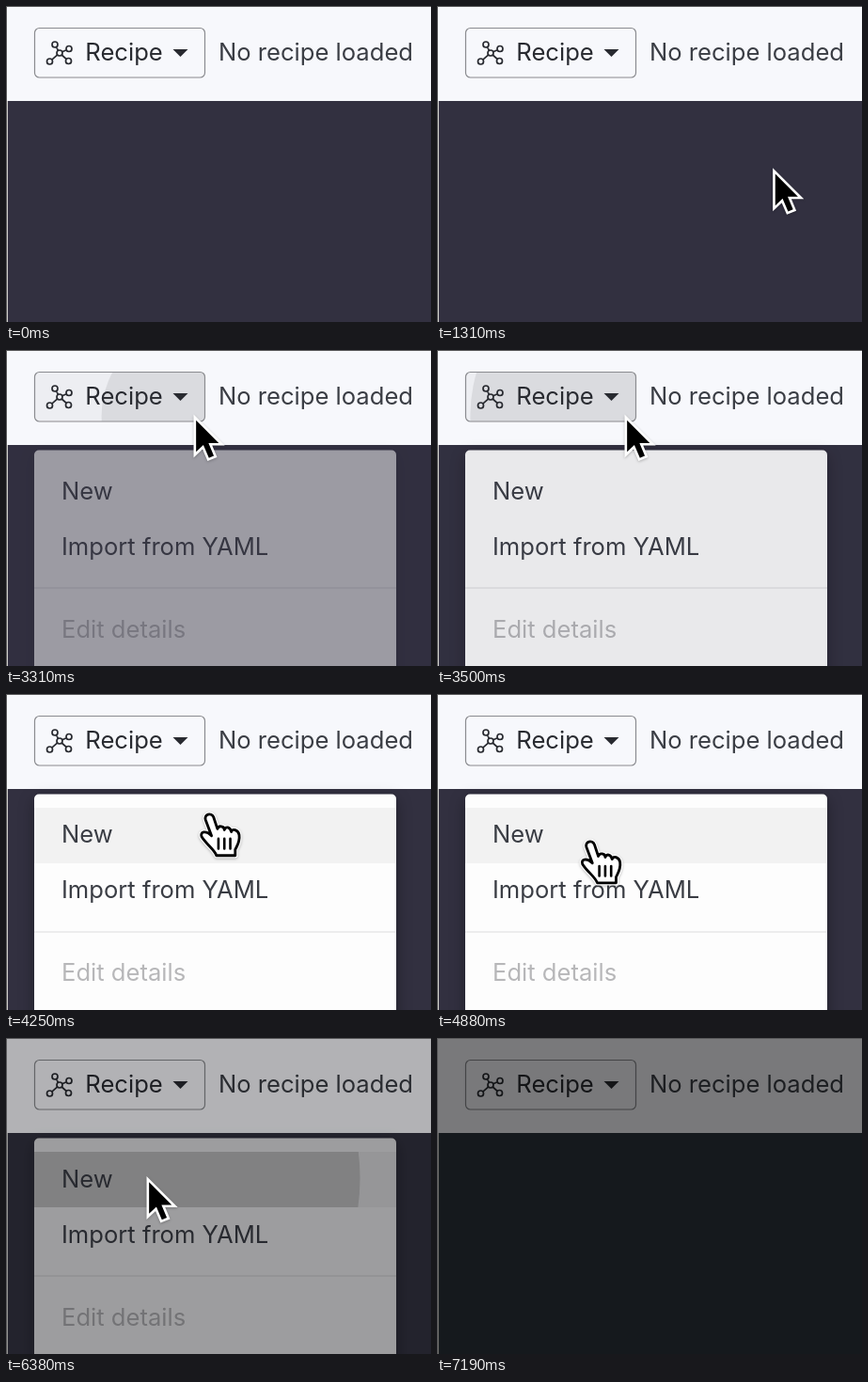
Animation, 452 px wide and 336 px high, one loop 7.25 s. Source, as an HTML page with a canvas:

```html
<!DOCTYPE html>
<html lang="en">
<head>
<meta charset="utf-8">
<title>Recipe menu</title>
<style>
html, body { margin: 0; width: 100%; height: 100%; overflow: hidden; }
canvas { display: block; }
</style>
</head>
<body>
<canvas id="stage" width="452" height="336"></canvas>
<script>
const ctx = document.getElementById('stage').getContext('2d');
const LOOP = 7250, STEP = 62.5;
const INK = '#3a3d44', STRONG = '#282a30';

const ramp = (t, from, to) => Math.min(1, Math.max(0, (t - from) / (to - from)));
const easeOut = (p, power) => 1 - (1 - p) ** power;
const mix = (a, b, p) => a + (b - a) * p;

// Pointer tip: start, end, x, y, ease-out power
const start = [386, 192];
const moves = [
  [1250, 2000, 202, 75, 2],
  [2250, 2630, 199, 69.5, 2],
  [3880, 4630, 228, 158, 1.5],
  [4630, 4690, 244, 165, 1],
  [4690, 5380, 122, 150, 3.4],
  [5440, 5630, 154, 148, 1.5],
  [5750, 5880, 149, 148, 1],
  [6940, 7130, 397, 202, 1]
];

const arrow = new Path2D('M3 5v32l7.4-7 5.6 13 5-2-5.4-13H26Z');
const hand = new Path2D('M13 24L7 8C5 2 13 0 15 5L19 17C20 13 26 14 26 18C27 14 32 15 33 20' +
  'C34 16 40 18 41 23C42 30 39 34 37 38V44H18C16 38 8 33 3 25C1 20 7 18 13 24Z');
const fingers = new Path2D('M20 27v10M26 27v10M32 27v10');
const caret = new Path2D('M177.5 46h16l-8 8Z');

function rect(color, x, y, w, h) {
  ctx.fillStyle = color;
  ctx.fillRect(x, y, w, h);
}

function text(str, x, y, color) {
  ctx.fillStyle = color;
  ctx.fillText(str, x, y);
}

function box(x, y, w, h, r) {
  ctx.beginPath();
  ctx.roundRect(x, y, w, h, r);
}

function stroke(path, color, width) {
  ctx.strokeStyle = color;
  ctx.lineWidth = width;
  ctx.stroke(path);
}

function ripple(x, y, radius, alpha) {
  ctx.fillStyle = `rgba(0,0,0,${alpha})`;
  ctx.beginPath();
  ctx.arc(x, y, radius, 0, 7);
  ctx.fill();
}

function drawIcon() {
  const hub = [57, 50];
  ctx.strokeStyle = STRONG;
  ctx.lineWidth = 1.7;
  for (const [x, y] of [[52, 41], [67, 45.5], [66.5, 58.5], [46.5, 59], hub]) {
    const dx = x - hub[0], dy = y - hub[1], d = Math.hypot(dx, dy);
    ctx.beginPath();
    if (d) {
      ctx.moveTo(hub[0] + dx / d * 3, hub[1] + dy / d * 3);
      ctx.lineTo(x - dx / d * 3, y - dy / d * 3);
    }
    ctx.moveTo(x + 3, y);
    ctx.arc(x, y, 3, 0, 7);
    ctx.stroke();
  }
}

function drawButton(t) {
  ctx.save();
  box(30.5, 23.5, 181, 52.5, 5);
  ctx.clip();
  const fade = 1 - ramp(t, 3560, 3880);
  rect(`rgba(0,0,0,${0.04 * ramp(t, 2250, 2500) * fade})`, 30, 23, 182, 54);
  if (t > 3180) ripple(199, 70, 176 * easeOut(ramp(t, 3190, 3740), 3.2), 0.08 * fade);
  ctx.restore();

  box(30.5, 23.5, 181, 52.5, 5);
  ctx.strokeStyle = '#8b8c90';
  ctx.lineWidth = 1.2;
  ctx.stroke();
  drawIcon();
  text('Recipe', 84.3, 58, STRONG);
  ctx.fillStyle = STRONG;
  ctx.fill(caret);
}

function drawMenu(t, panel) {
  const alpha = easeOut(ramp(t, 3190, 3810), 3.4) * (1 - ramp(t, 6130, 6630) ** 2.5);
  if (!alpha) return;
  const shift = alpha < 0.99 ? 1 : 0;
  ctx.save();
  ctx.shadowColor = `rgba(0,0,0,${0.35 * alpha})`;
  ctx.shadowBlur = 16;
  ctx.shadowOffsetY = 5;
  box(30, 106.5, 385, 260, 5);
  ctx.fillStyle = '#fdfdfd';
  ctx.fill();
  ctx.restore();

  ctx.save();
  ctx.beginPath();
  ctx.rect(30, 121, 385, 59);
  ctx.clip();
  rect(`rgba(0,0,0,${0.045 * ramp(t, 3560, 3880)})`, 30, 121, 385, 59);
  if (t > 6120) ripple(150, 149, 267 * easeOut(ramp(t, 6130, 6680), 3.2), 0.15);
  ctx.restore();

  rect('#dcdcdd', 30, 252.5, 385, 1);
  text('New', 59, 158 + shift, INK);
  text('Import from YAML', 59, 216.5 + shift, INK);
  text('Edit details', 59, 305 + shift, '#b7b7b9');

  // Fade the whole menu as one layer by veiling it with the panel
  ctx.save();
  ctx.globalAlpha = 1 - alpha;
  rect(panel, 2, 101, 450, 235);
  ctx.restore();
}

function drawPointer(t) {
  if (t < 1300 || t > 7180) return;
  let [x, y] = start;
  for (const [from, to, nx, ny, power] of moves) {
    const p = easeOut(ramp(t, from, to), power);
    x = mix(x, nx, p);
    y = mix(y, ny, p);
  }
  const isHand = t > 3900 && t < 6150 && y > 121;
  ctx.save();
  ctx.shadowColor = 'rgba(0,0,0,.25)';
  ctx.shadowBlur = 3;
  ctx.shadowOffsetY = 1;
  ctx.translate(x, y);
  ctx.scale(1.05, 1.05);
  if (isHand) {
    ctx.translate(-12, -0.5);
    ctx.lineJoin = ctx.lineCap = 'round';
    stroke(hand, '#fff', 5);
    ctx.shadowColor = 'transparent';
    ctx.fillStyle = '#fff';
    ctx.fill(hand);
    stroke(hand, '#000', 2.7);
    stroke(fingers, '#000', 2.5);
  } else {
    stroke(arrow, '#fff', 5);
    ctx.shadowColor = 'transparent';
    ctx.fillStyle = '#000';
    ctx.fill(arrow);
  }
  ctx.restore();
}

function draw(t) {
  const dim = easeOut(ramp(t, 6130, 6630), 1.2);
  const shade = [[50, 43], [48, 51], [64, 59]].map(([a, b]) => mix(a, b, dim ** 3));
  const panel = `rgb(${shade})`;
  ctx.font = '25.6px Inter, "Liberation Sans", sans-serif';
  rect('#f7f8fc', 0, 0, 452, 101);
  rect(panel, 0, 101, 452, 235);
  rect('#d0d0cc', 1, 101, 1, 235);
  drawButton(t);
  text('No recipe loaded', 226, 58, INK);
  drawMenu(t, panel);
  rect(`rgba(0,0,0,${0.51 * dim})`, 1, 1, 451, 335);
  rect('#59595b', 0, 0, 452, 1);
  rect('#59595b', 0, 0, 1, 336);
  drawPointer(t);
}

function frame(now) {
  // The picture advances sixteen times a second
  draw(Math.floor((now % LOOP + 3) / STEP) * STEP % LOOP);
  requestAnimationFrame(frame);
}
requestAnimationFrame(frame);
</script>
</body>
</html>
```
